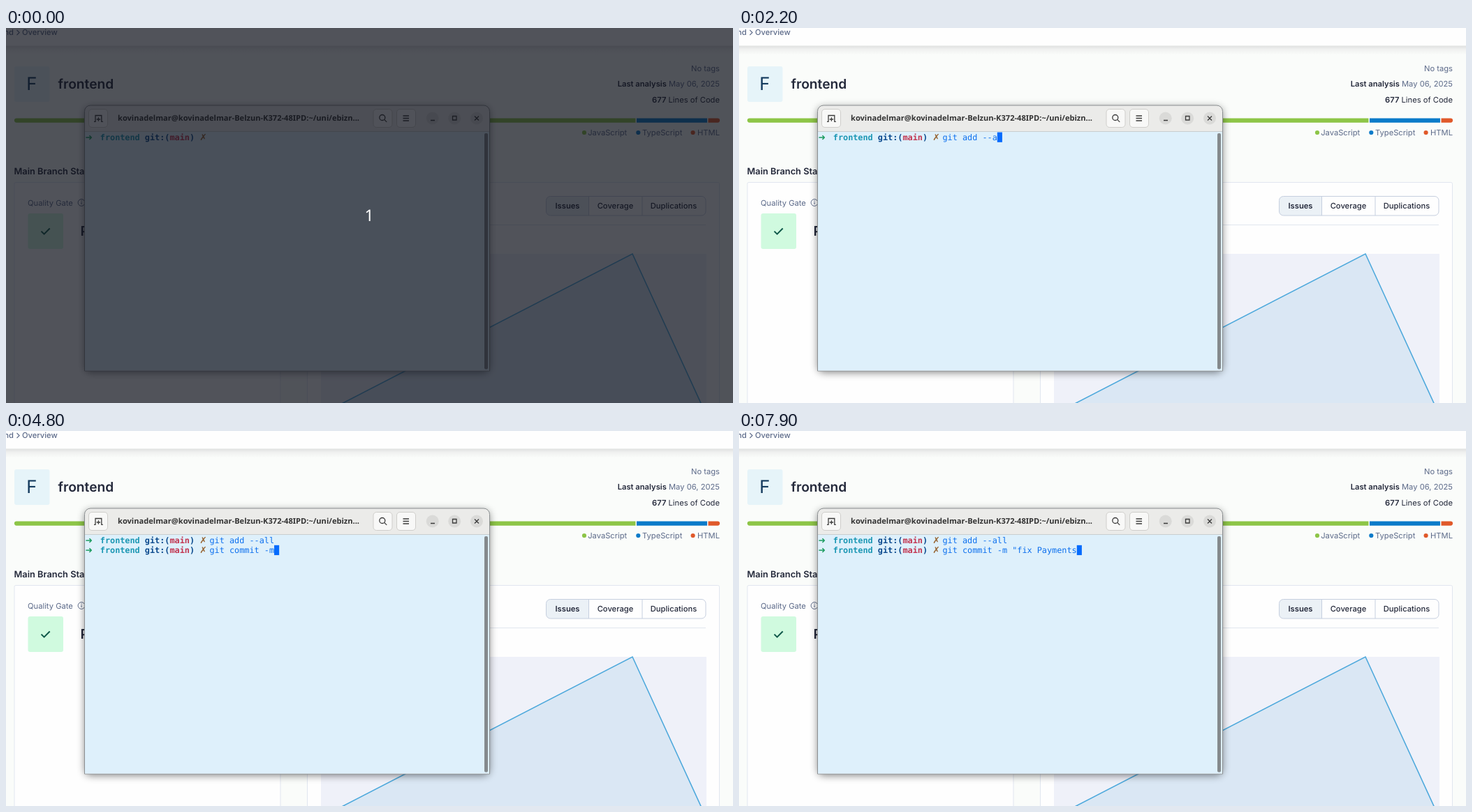
An HTML page that plays this animation: 1041 px wide and 538 px high, repeating every 8000 ms.

```html
<!DOCTYPE html>
<html lang="en">
<head>
<meta charset="utf-8">
<title>Terminal over dashboard</title>
<style>
  html, body { margin: 0; width: 100%; height: 100%; overflow: hidden; background: #fafcfa; }
  svg { display: block; width: 100vw; height: 100vh; }
  text { font-family: Inter, sans-serif; font-size: 11.2px; white-space: pre; text-rendering: geometricPrecision; }
  .muted { fill: #5d6b8a; }
  .dark { fill: #23283a; }
  .semi { font-weight: 600; }
  .mid { text-anchor: middle; }
  .end { text-anchor: end; }
  .card { fill: #fefefe; stroke: #e1e6f0; }
  .icon { fill: none; stroke: #3b3b3b; stroke-width: 1.3; }
  .button { fill: #f8f8f7; stroke: #cfcecb; }
  .mono { font-family: "DejaVu Sans Mono", monospace; font-size: 11.83px; }
  .bold { font-weight: 700; }
  .sign { font-family: "DejaVu Sans", sans-serif; font-size: 12.5px; }
</style>
</head>
<body>
<svg viewBox="0 0 1041 538" preserveAspectRatio="none">
  <defs>
    <linearGradient id="fade" x2="0" y2="1">
      <stop offset="0" stop-color="#dfe0e0"/>
      <stop offset=".4" stop-color="#f0f1f0"/>
      <stop offset="1" stop-color="#fafcfa"/>
    </linearGradient>
    <filter id="blur" x="-10%" y="-10%" width="120%" height="120%">
      <feGaussianBlur stdDeviation="6"/>
    </filter>
  </defs>

  <!-- dashboard -->
  <rect width="1041" height="538" fill="#fafcfa"/>
  <rect width="1041" height="25.5" fill="#fefefe"/>
  <rect y="25.5" width="1041" height="13" fill="url(#fade)"/>
  <g class="muted" font-weight="500">
    <text x="10.8" y="10" class="end">frontend</text>
    <text x="23" y="10">Overview</text>
  </g>
  <path d="M15.5 2.8l3.6 3.7-3.6 3.7" fill="none" stroke="#5d6b8a" stroke-width="1.2"/>

  <rect x="12" y="55" width="50.5" height="51" rx="3" fill="#e6f4f9"/>
  <text x="36.8" y="89.3" class="mid" style="font-size:25.6px" fill="#12395c">F</text>
  <text x="74.5" y="87" class="dark semi" style="font-size:19.2px">frontend</text>
  <text x="1022" y="62" class="muted end">No tags</text>
  <text x="1022" y="84" class="muted end"><tspan class="dark semi">Last analysis</tspan> May 06, 2025</text>
  <text x="1022" y="106.5" class="dark end"><tspan class="semi">677</tspan> Lines of Code</text>

  <path d="M901.5 129.5H15a3 3 0 0 0 0 6.2H901.5z" fill="#8dc547"/>
  <path d="M903 129.5h101v6.2h-101z" fill="#0b7bc9"/>
  <path d="M1005.5 129.5h13.5a3 3 0 0 1 0 6.2h-13.5z" fill="#e0592a"/>
  <circle cx="828" cy="150" r="3.1" fill="#8dc547"/>
  <circle cx="905.3" cy="150" r="3.1" fill="#0b7bc9"/>
  <circle cx="983.6" cy="150" r="3.1" fill="#e0592a"/>
  <g class="muted">
    <text x="889.3" y="154" class="end">JavaScript</text>
    <text x="968.3" y="154" class="end">TypeScript</text>
    <text x="1022" y="154" class="end">HTML</text>
  </g>

  <text x="11.5" y="210" class="dark semi" style="font-size:12.8px">Main Branch Status</text>
  <rect class="card" x="12" y="221.5" width="381" height="340" rx="2"/>
  <rect class="card" x="431.5" y="221.5" width="590" height="340" rx="2"/>

  <text x="31" y="254.5" class="muted">Quality Gate</text>
  <circle cx="108" cy="250.5" r="4.9" fill="none" stroke="#5d6b8a"/>
  <path d="M108 249.8v3.3M108 247.6v1.2" stroke="#5d6b8a" stroke-width="1.1"/>
  <rect x="31.5" y="266" width="50.5" height="51" rx="3" fill="#d0fadf"/>
  <path d="M50.5 291.6l4.1 4.1 8.1-8.2" fill="none" stroke="#10594a" stroke-width="2"/>
  <text x="106.5" y="298" class="dark semi" style="font-size:19.2px">Passed</text>

  <path d="M451 282.5H1002" stroke="#e1e6ee"/>
  <path d="M779.5 241.5H834.5V269H779.5a6 6 0 0 1-6-6V247.500a6 6 0 0 1 6-6z" fill="#ebf1f6"/>
  <rect x="773.5" y="241.500" width="228.500" height="27.500" rx="6" fill="none" stroke="#c6cfdf"/>
  <path d="M834.5 241.500V269M911 241.500V269" stroke="#c6cfdf"/>
  <g class="dark mid" font-weight="500">
    <text x="804" y="259" class="semi">Issues</text>
    <text x="872.500" y="259">Coverage</text>
    <text x="956" y="259">Duplications</text>
  </g>

  <rect x="451" y="324" width="552" height="214" fill="#eff1f9"/>
  <path d="M440 560L897 324L1005 560" fill="#dae7f4" stroke="#4ea9dc" stroke-width="1.6"/>

  <!-- terminal window -->
  <rect x="113" y="114" width="579" height="380" rx="8" fill="#000" opacity=".5" filter="url(#blur)"/>
  <path d="M112.500 492V119.500a8.500 8.500 0 0 1 8.500-8.500H684a8.500 8.500 0 0 1 8.500 8.500V492z" fill="#ebebe9" stroke="#8b8f91"/>
  <path d="M113 148.500H692V491.500H113z" fill="#def0fb"/>
  <path d="M113 148.500H692" stroke="#c9cdce"/>
  <rect x="685" y="151" width="5" height="338.500" rx="2" fill="#858a8d"/>

  <g id="buttons"></g>
  <g class="icon">
    <path d="M126 134.300h2v-8.800h8.800v8.800h2M132.400 128.300v5.400M129.700 131h5.400"/>
    <circle cx="538.800" cy="128.500" r="4"/>
    <path d="M541.700 131.400l3.500 3.500"/>
    <path d="M568.500 126h8.500M568.500 129.500h8.500M568.500 133h8.500"/>
    <path d="M608 132.500h6M639.500 126.500h5.500v5.500h-5.500zM671 126.500l6 6M677 126.500l-6 6"/>
  </g>
  <text x="160" y="133.300" class="bold" fill="#343434" style="font-family:'Noto Sans',sans-serif;font-size:11.1px">kovinadelmar@kovinadelmar-Belzun-K372-48IPD:~/uni/ebizn...</text>

  <g id="lines"></g>

  <!-- countdown -->
  <g id="count">
    <rect width="1041" height="538" fill="rgb(16,19,29)" fill-opacity=".72"/>
    <text x="520" y="277" class="mid" fill="#fff" style="font-family:'Noto Sans',sans-serif;font-size:23px">1</text>
  </g>
</svg>
<script>
  const LOOP = 8000, LEFT = 113.4, CELL = 7.122, ROW = 14.24;
  const $ = id => document.getElementById(id);

  function add(parent, tag, attrs, text = "") {
    const el = document.createElementNS("http://www.w3.org/2000/svg", tag);
    for (const key in attrs) el.setAttribute(key, attrs[key]);
    el.textContent = text;
    parent.append(el);
    return el;
  }

  for (const x of [118.5, 526, 559.5])
    add($("buttons"), "rect", { class: "button", x, y: 116.5, width: 27, height: 26, rx: 4.5 });
  for (const cx of [610.7, 642.2, 674])
    add($("buttons"), "circle", { cx, cy: 129.5, r: 9, fill: "#dadad8" });

  const cellX = n => LEFT + n * CELL;
  const PROMPT_CELLS = 25;
  const prompt = [
    [0, "➜", "#1f9d62", "sign bold"],
    [3, "frontend", "#1c97b4", "mono bold"],
    [12, "git:(", "#0b4a8e", "mono bold"],
    [17, "main", "#c2344f", "mono bold"],
    [21, ")", "#0b4a8e", "mono bold"],
    [23, "✗", "#96622f", "sign"]
  ];

  // The first key time shows the cursor; each later one types a character.
  const lines = [
    { text: "git add --all", shownAt: 0, until: 2600,
      keys: [300, 400, 500, 700, 800, 900, 1200, 1400, 1600, 1900, 2000, 2200, 2300, 2400] },
    { text: 'git commit -m "fix Payments', shownAt: 2600, until: LOOP,
      keys: [2600, 3100, 3100, 3300, 3400, 3700, 3700, 3800, 4000, 4100, 4200, 4300, 4500, 4800,
             5000, 5200, 5500, 5700, 5800, 5900, 6500, 6700, 7200, 7400, 7500, 7700, 7800, 7900] }
  ];

  lines.forEach((line, row) => {
    const top = 149.6 + row * ROW, y = top + 11.4;
    line.group = add($("lines"), "g", {});
    for (const [n, text, fill, cls] of prompt)
      add(line.group, "text", { x: cellX(n), y, fill, class: cls }, text);
    line.typed = add(line.group, "text", { x: cellX(PROMPT_CELLS), y, fill: "#0d70ee", class: "mono" });
    line.cursor = add(line.group, "rect", { y: top, width: CELL, height: ROW, fill: "#056bfd" });
  });

  const show = (el, on) => el.setAttribute("visibility", on ? "inherit" : "hidden");

  function draw(t) {
    show($("count"), t < 100);
    for (const line of lines) {
      const typed = line.keys.filter(k => k <= t).length - 1;
      const count = Math.max(0, typed);
      show(line.group, t >= line.shownAt);
      show(line.cursor, typed >= 0 && t < line.until);
      line.typed.textContent = line.text.slice(0, count);
      line.cursor.setAttribute("x", cellX(PROMPT_CELLS + count));
    }
  }

  const start = performance.now();
  function tick() {
    draw((performance.now() - start) % LOOP);
    requestAnimationFrame(tick);
  }
  tick();
</script>
</body>
</html>
```
